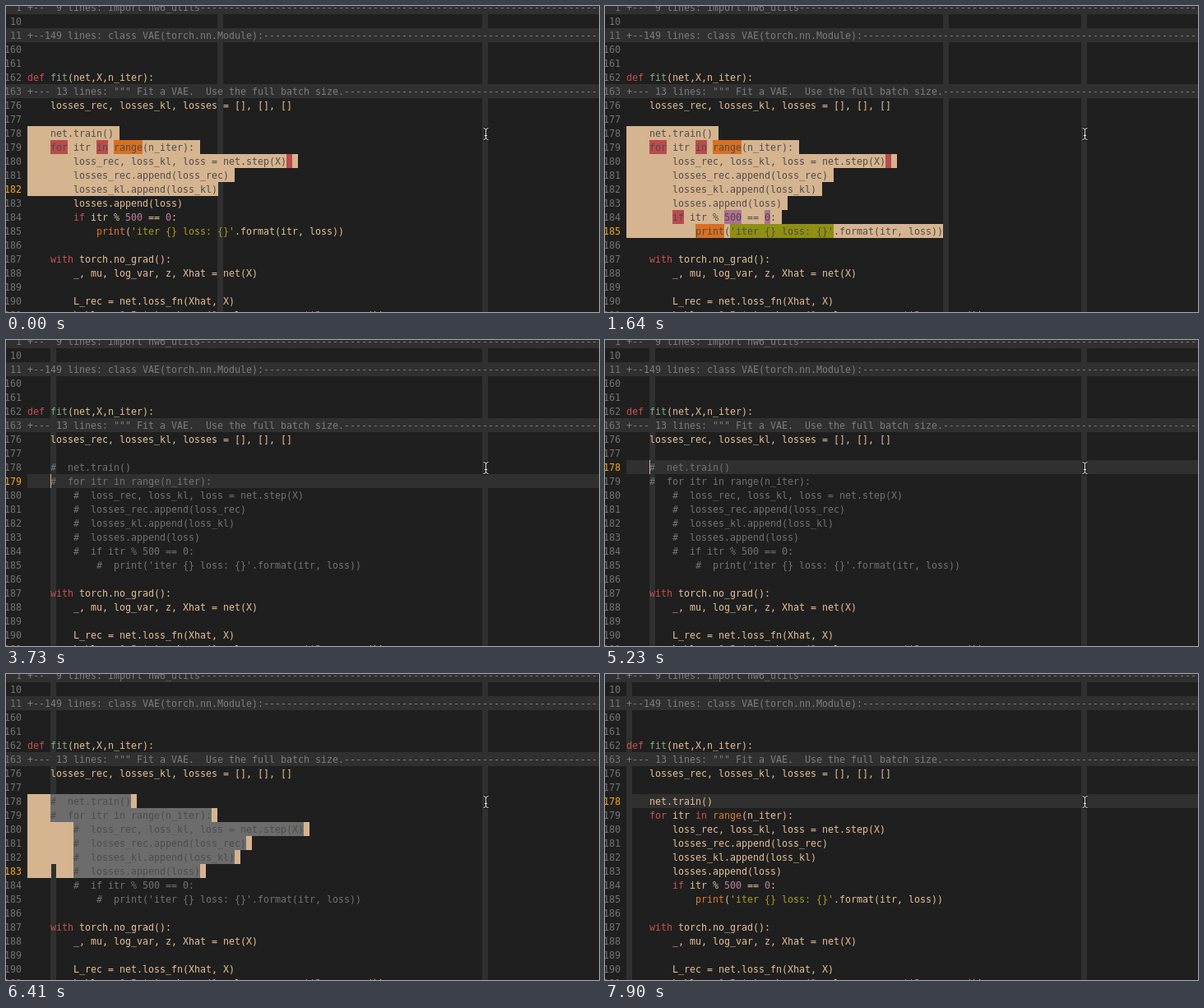
An HTML page with a canvas that plays this animation: 721 px wide and 372 px high, repeating every 8 s.

```html
<!DOCTYPE html>
<html>
<head>
<meta charset="utf-8">
<style>
html, body { margin: 0; width: 100%; height: 100%; overflow: hidden; background: #1f1f1f; }
canvas { display: block; }
</style>
</head>
<body>
<canvas id="stage" width="721" height="372"></canvas>
<script>
const ctx = document.getElementById('stage').getContext('2d');
const LOOP = 8000, LEFT = 26, CELL = 7, ROW = 17, TOP = -7;
const BG = '#1f1f1f', SHADE = '#303030', FG = '#e5c096', SEL = '#d5b490', SEL_TEXT = '#4e4c4a', GRAY = '#737373';

// token kind: [text colour, selected background]
const COLORS = {
  plain: [FG, SEL],
  keyword: ['#c9504f', '#b84c4c'],
  builtin: ['#dd7a28', '#d87020'],
  number: ['#c47da0', '#ae7090'],
  string: ['#a3a01c', '#8f8f12'],
  func: ['#87a987', '#87a987'],
  comment: [GRAY, '#6c6c6c'],
  trail: [BG, '#b84c4c']
};

const LINES = [
  [1, '+--  9 lines: import hw6_utils'],
  [10, ''],
  [11, '+--149 lines: class VAE(torch.nn.Module):'],
  [160, ''],
  [161, ''],
  [162, 'def fit(net,X,n_iter):'],
  [163, '+--- 13 lines: """ Fit a VAE.  Use the full batch size.'],
  [176, '    losses_rec, losses_kl, losses = [], [], []'],
  [177, ''],
  [178, '    net.train()'],
  [179, '    for itr in range(n_iter):'],
  [180, '        loss_rec, loss_kl, loss = net.step(X) '],
  [181, '        losses_rec.append(loss_rec)'],
  [182, '        losses_kl.append(loss_kl)'],
  [183, '        losses.append(loss)'],
  [184, '        if itr % 500 == 0:'],
  [185, "            print('iter {} loss: {}'.format(itr, loss))"],
  [186, ''],
  [187, '    with torch.no_grad():'],
  [188, '        _, mu, log_var, z, Xhat = net(X)'],
  [189, ''],
  [190, '        L_rec = net.loss_fn(Xhat, X)'],
  [191, '        L_kl = -0.5 * torch.sum(1 + log_var - mu**2 - z.exp())']
];

// cursor position: [time, line, column]
const MOVES = [
  [0, 182, 33], [150, 183, 27], [290, 184, 26], [440, 185, 55],
  [3730, 179, 4], [5230, 178, 4], [5820, 179, 4], [5970, 180, 4], [6110, 181, 4],
  [6260, 182, 4], [6410, 183, 4], [6560, 184, 4], [6710, 185, 4], [7900, 178, 0]
];
const BLINKS = [[1640, 2230], [2680, 3130], [4780, 5230], [7760, LOOP]];

const within = (t, a, b) => t >= a && t < b;
const colX = col => LEFT + col * CELL;

function box(color, x, y, w, h) {
  ctx.fillStyle = color;
  ctx.fillRect(x, y, w, h);
}

function write(text, color, col, y) {
  ctx.fillStyle = color;
  ctx.fillText(text, colX(col), y + 13);
}

function kindOf(s) {
  if (s[0] === '#') return 'comment';
  if (s[0] === "'") return 'string';
  if (/^(def|for|in|if|with)$/.test(s)) return 'keyword';
  if (/^(range|print)$/.test(s)) return 'builtin';
  if (s === 'fit') return 'func';
  if (/^\d/.test(s)) return 'number';
  return 'plain';
}

function tokens(text) {
  const parts = text.match(/#.*|'[^']*'|\d[\d.]*|\w+|\s+|[^\w\s]/g) || [];
  let col = 0;
  return parts.map(s => {
    const end = col + s.length;
    const trailing = col > 0 && end === text.length && !s.trim();
    const token = { s, col, kind: trailing ? 'trail' : kindOf(s) };
    col = end;
    return token;
  });
}

function drawCode(text, y, selected, skipCol) {
  const list = tokens(text);
  if (selected) {
    for (const { s, col, kind } of list) {
      box(COLORS[kind][1], colX(col), y, s.length * CELL, ROW);
    }
    if (skipCol !== text.length) box(SEL, colX(text.length), y, CELL, ROW);
    if (skipCol >= 0) box(SHADE, colX(skipCol), y, CELL, ROW);
  }
  for (const { s, col, kind } of list) {
    if (!s.trim()) continue;
    write(s, selected ? SEL_TEXT : COLORS[kind][0], col, y);
    if (selected && col === skipCol) write(s[0], COLORS[kind][0], col, y);
  }
}

function drawPointer() {
  const beam = new Path2D('M580.5 148.5 Q583.5 148.5 583.5 151 V160 Q583.5 162.5 580.5 162.5 M586.5 148.5 Q583.5 148.5 583.5 151 M583.5 160 Q583.5 162.5 586.5 162.5 M582 157.5 H585');
  ctx.strokeStyle = '#111';
  ctx.lineWidth = 3;
  ctx.stroke(beam);
  ctx.strokeStyle = '#eee';
  ctx.lineWidth = 1;
  ctx.stroke(beam);
}

function draw(t) {
  const [, line, column] = MOVES.filter(m => m[0] <= t).pop();
  const commented = within(t, 3730, 7900);
  const visual = t < 3730 || within(t, 5670, 7900);

  box(BG, 0, 0, 721, 372);
  box(SHADE, colX(79), 0, CELL, 372);
  box(SHADE, colX(column), 0, CELL, 372);
  ctx.font = '11.63px "DejaVu Sans Mono", monospace';

  LINES.forEach(([number, code], i) => {
    const y = TOP + i * ROW;
    const current = number === line;
    const fold = code[0] === '+';
    const inBlock = within(number, 178, 186);
    const selected = visual && inBlock && number <= line;

    if (fold || (current && !visual)) box(SHADE, fold ? 0 : LEFT, y, 721, ROW);
    write(String(number).padStart(3), current ? '#f0a61c' : GRAY, -4, y);

    if (fold) {
      write(code.padEnd(100, '-'), '#7d7d7d', 0, y);
    } else {
      const text = commented && inBlock ? code.trimEnd().replace(/\S/, '#  $&') : code;
      drawCode(text, y, selected, current ? column : -1);
    }
    if (current && !BLINKS.some(b => within(t, ...b))) box(SEL, colX(column), y, 1, ROW);
  });
  drawPointer();
}

function tick(now) {
  draw(now % LOOP);
  requestAnimationFrame(tick);
}
requestAnimationFrame(tick);
</script>
</body>
</html>
```
